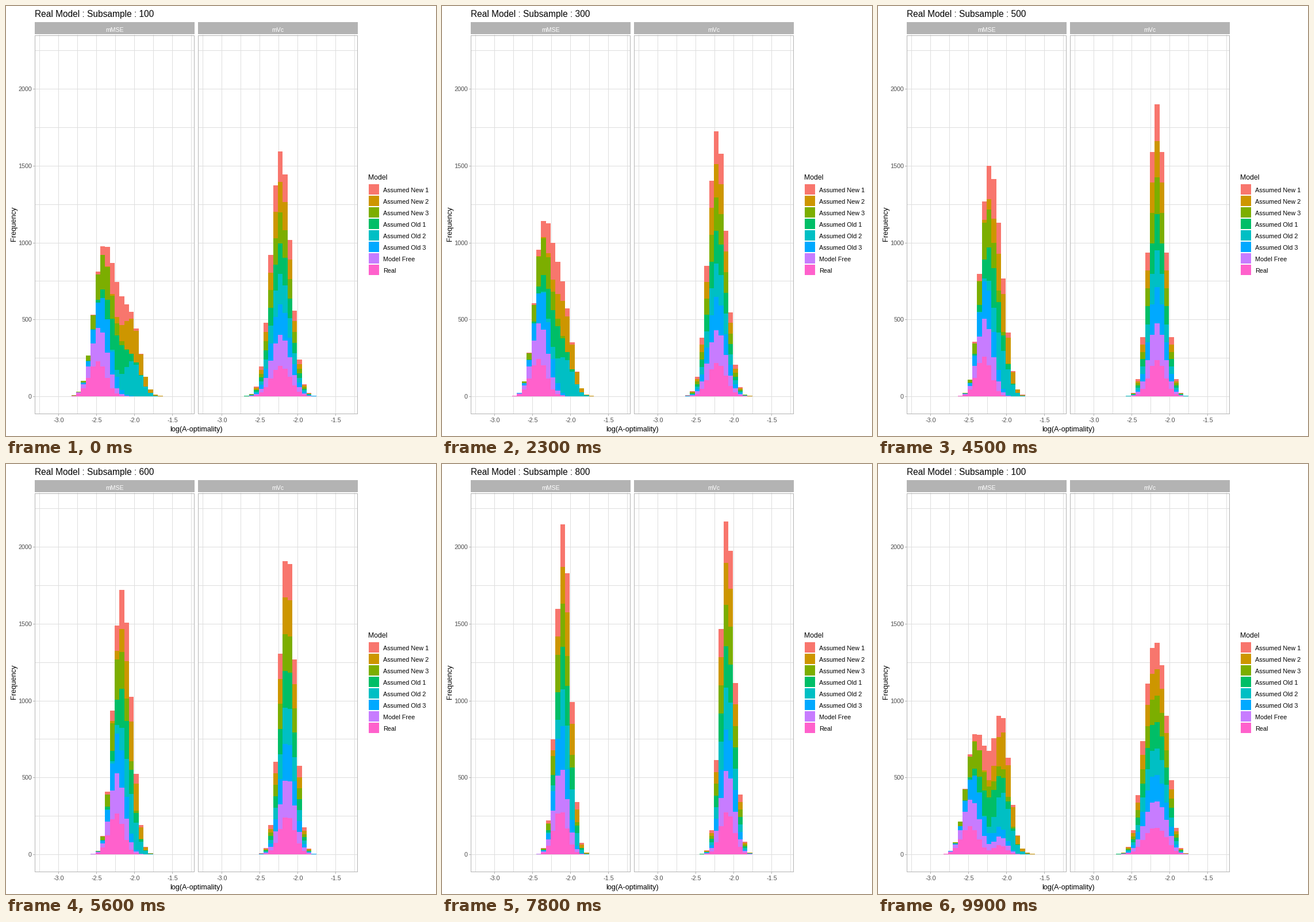
A matplotlib script for the animation above (10 s loop, 748 by 748 pixels).

```python
import numpy as np
import matplotlib.pyplot as plt
from matplotlib.animation import FuncAnimation
from matplotlib.patches import Rectangle

plt.rcParams["font.family"] = "Liberation Sans"

SIZE, DPI = 748, 64
PX = 72 / DPI                      # points per pixel
BINS, BIN_W, BIN_X0 = 30, 8.358, 63.6
ZERO_Y, Y_SCALE = 678.9, 0.26736   # pixel row of zero, pixels per count
PANEL_DX = (0, 284)
GREY_LINE, GREY_GRID, GREY_TEXT = "#B3B3B3", "#DEDEDE", "#4D4D4D"

# Bottom of the stack first: name, colour, mean curve in the mMSE panel
MODELS = [
    ("Real", "#FF61CC", "real"),
    ("Model Free", "#C77CFF", "free"),
    ("Assumed Old 3", "#00A9FF", "third"),
    ("Assumed Old 2", "#00BFC4", "second"),
    ("Assumed Old 1", "#00BE67", "first"),
    ("Assumed New 3", "#7CAE00", "third"),
    ("Assumed New 2", "#CD9600", "second"),
    ("Assumed New 1", "#F8766D", "first"),
]

# Mean bin of each curve at the key subsample sizes, linear in between
KEYS = (100, 300, 500, 700, 900)
MEANS = {
    "real": (11.0, 12.0, 13.9, 15.8, 17.3),
    "free": (11.6, 12.5, 14.4, 16.1, 17.4),
    "third": (12.4, 13.05, 14.55, 16.15, 17.45),
    "second": (18.2, 17.5, 17.55, 17.7, 17.95),
    "first": (14.9, 15.1, 15.9, 17.05, 17.65),
    "mVc": (15.1, 15.2, 16.0, 16.95, 17.67),
}

SIZES = range(100, 1000, 100)
STARTS = [6, 18, 30, 41, 52, 63, 74, 85, 96]
LENGTHS = [6, 6, 5, 5, 5, 5, 5, 5, 5]
EDGES = np.arange(BINS + 1)


def counts(curve, sd, n):
    """Histogram of 1000 normal draws around the curve's mean bin."""
    z = (EDGES[:-1] - np.interp(n, KEYS, MEANS[curve])) / sd
    return 1000 * np.exp(-z ** 2 / 2) / (sd * np.sqrt(2 * np.pi))


def state(n):
    """Stacked bar tops: panel x model x bin."""
    mmse = [counts(curve, 1.8 - 0.0005 * n, n) for *_, curve in MODELS]
    mvc = [counts("mVc", 2.08 - 0.0008 * n, n) for _ in MODELS]
    return np.round(np.cumsum([mmse, mvc], axis=1))


STATES = [state(n) for n in SIZES]

fig = plt.figure(figsize=(SIZE / DPI, SIZE / DPI), dpi=DPI, facecolor="white")
ax = fig.add_axes([0, 0, 1, 1])
ax.set_xlim(0, SIZE)
ax.set_ylim(SIZE, 0)
ax.axis("off")


def text(x, y, s, size, color="black", **kw):
    return ax.text(x, y, s, fontsize=size * PX, color=color,
                   va="baseline", **kw)


def box(x0, y0, x1, y1, fill="none", edge="none", z=1):
    ax.add_patch(Rectangle((x0, y0), x1 - x0, y1 - y0, fc=fill, ec=edge,
                           lw=PX if edge != "none" else 0,
                           antialiased=False, zorder=z))


def line(xs, ys, color):
    ax.plot(xs, ys, color=color, lw=PX, antialiased=False, zorder=1,
            solid_capstyle="butt")


def count_y(count):
    return ZERO_Y - Y_SCALE * count


def draw_panel(dx, name):
    x0, x1 = 50.5 + dx, 327.5 + dx
    for i in range(9):
        x = 58.5 + 33 * i + dx
        line([x, x], [50, 708], GREY_GRID)
    for count in range(0, 2500, 250):
        line([x0, x1], [count_y(count)] * 2, GREY_GRID)
    for i, label in enumerate(["-3.0", "-2.5", "-2.0", "-1.5"]):
        x = 91.5 + 66 * i + dx
        line([x, x], [709, 712], GREY_LINE)
        text(x, 723.5, label, 10.7, GREY_TEXT, ha="center")
    box(x0 - 0.5, 28, x1 + 0.5, 49, GREY_LINE)
    text((x0 + x1) / 2, 44.5, name, 10.5, "white", ha="center")
    box(x0, 50.5, x1, 708.5, edge=GREY_LINE, z=3)


for dx, name in zip(PANEL_DX, ("mMSE", "mVc")):
    draw_panel(dx, name)

for count in range(0, 2500, 500):
    y = count_y(count)
    line([47.5, 50], [y, y], GREY_LINE)
    text(45, y + 4, str(count), 10.8, GREY_TEXT, ha="right")

text(331, 740, "log(A-optimality)", 12.6, ha="center")
text(17.5, 379, "Frequency", 12.7, ha="center", rotation=90,
     rotation_mode="anchor")
title = text(50, 19, "", 15.5)

text(630, 302, "Model", 12.3)
for i, (name, color, _) in enumerate(reversed(MODELS)):
    y = 310 + 20 * i
    box(631, y, 649, y + 18, color)
    text(656, y + 14, name, 10.85)

FLOOR = np.full(BINS, ZERO_Y)
BARS = [[ax.stairs(FLOOR, BIN_X0 + dx + BIN_W * EDGES, baseline=FLOOR,
                   fill=True, color=color, antialiased=False, zorder=2)
         for _, color, _ in MODELS] for dx in PANEL_DX]


def pose(frame):
    """Index of the state left behind, the next one, and progress."""
    current, t = 0, 0.0
    for i, (start, length) in enumerate(zip(STARTS, LENGTHS)):
        if frame >= start:
            current, t = i, min((frame - start + 1) / length, 1)
    return current, (current + 1) % len(STATES), t


def update(frame):
    a, b, t = pose(frame)
    heights = (1 - t) * STATES[a] + t * STATES[b]
    for bars, tops in zip(BARS, heights):
        base = FLOOR
        for bar, top in zip(bars, count_y(tops)):
            bar.set_data(values=top, baseline=base)
            base = top
    title.set_text(f"Real Model : Subsample : {SIZES[b if t >= 0.5 else a]}")
    return [title] + BARS[0] + BARS[1]


anim = FuncAnimation(fig, update, frames=100, interval=100,
                     repeat=True, repeat_delay=0, blit=False)
plt.show()
```
